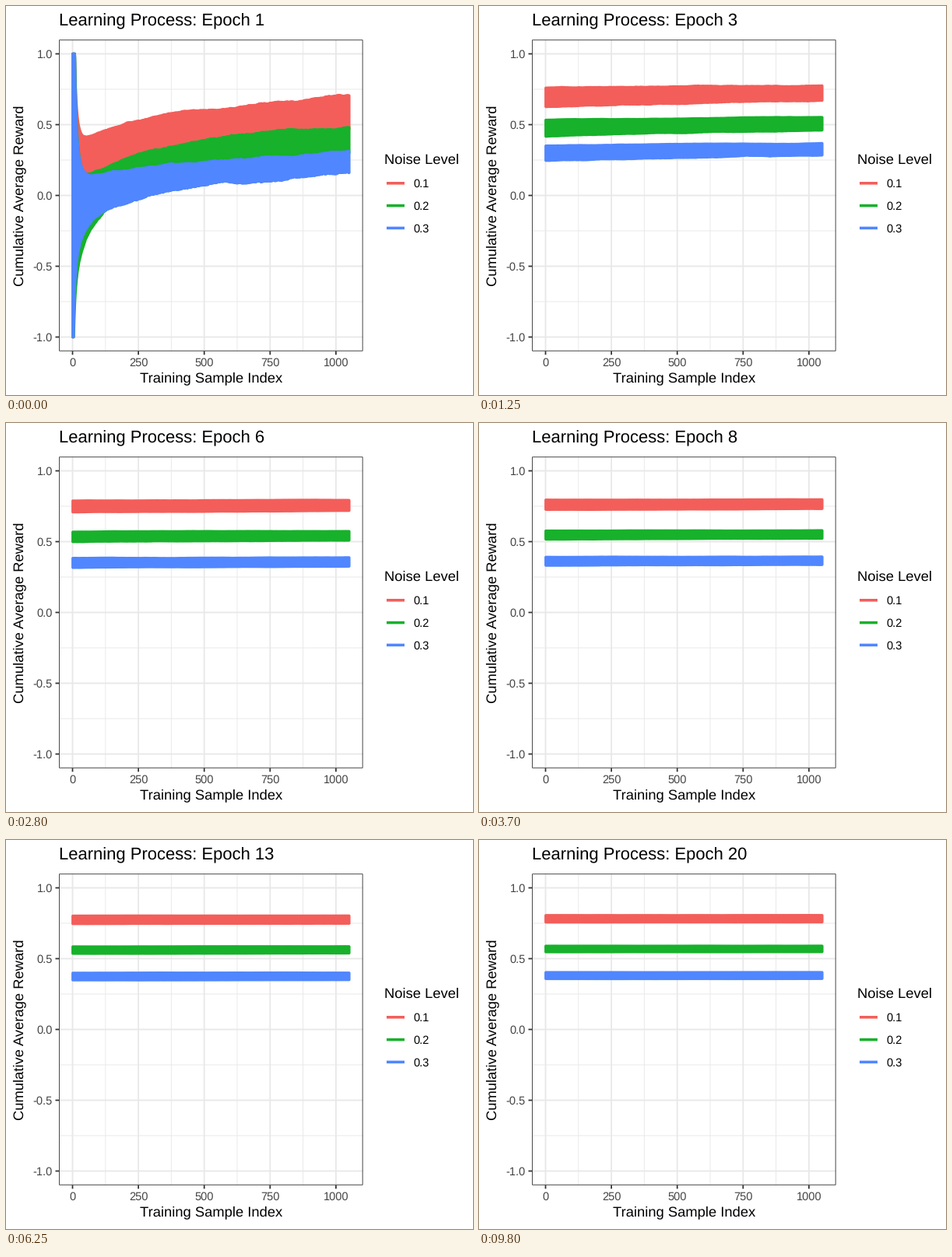
Recreate the animation shown at these times as a matplotlib script. Size 600 by 500 pixels, loop 10 s.

```python
import numpy as np
import matplotlib.pyplot as plt
from matplotlib.animation import FuncAnimation
from matplotlib.patches import Polygon, Rectangle

plt.rcParams.update({
    "font.family": "Liberation Sans",
    "text.hinting": "none",
    "path.snap": False,
})

W, H, DPI = 600, 500, 120
PT = 72 / DPI  # points per pixel
EPOCHS, SAMPLES = 20, 1050
LEFT, RIGHT, TOP, BOTTOM = 68.1, 458.6, 43.3, 443.7
GRID, DARK, LABEL = "#E8E8E8", "#333333", "#444444"
THICK = 3.56  # width of the data lines in pixels

# Name, colour, upper edge, lower edge of each band.
# Edge: long-run value, gap to it; first epoch: end value, log slope, spike.
LEVELS = [
    ("0.1", "#F35E5A", (0.812, 0.126, 0.705, 0.116, 8),
     (0.776, 0.355, 0.470, 0.160, -1)),
    ("0.2", "#17B12B", (0.597, 0.154, 0.480, 0.138, 12),
     (0.566, 0.354, 0.300, 0.200, -1)),
    ("0.3", "#5086FF", (0.410, 0.143, 0.310, 0.080, 10),
     (0.374, 0.302, 0.160, 0.125, -2)),
]

rng = np.random.default_rng(7)
index = np.arange(1, SAMPLES + 1)


def to_x(sample):
    return 85.5 + 0.3384 * np.asarray(sample)


def to_y(value):
    return 243.5 - 182 * np.asarray(value)


def bridge():
    """Random walk that starts and ends at zero, with unit deviation."""
    walk = np.cumsum(rng.normal(size=SAMPLES))
    walk -= np.linspace(walk[0], walk[-1], SAMPLES)
    return walk / walk.std()


def edge_states(limit, gap, end, slope, spike):
    """Edge of one band for every epoch, in pixels."""
    first = (end + slope * np.log(index / SAMPLES)
             + spike / index * np.exp(-index / 60) + 0.008 * bridge())
    states = [np.clip(first, -1, 1)]
    for done in range(1, EPOCHS):
        trend = limit - gap / (done + index / SAMPLES + 0.3)
        states.append(trend + 0.004 / done * bridge())
    return to_y(states)


def ease(p):
    return 4 * p ** 3 if p < 0.5 else 1 - 4 * (1 - p) ** 3


def locate(frame):
    """Epoch (from zero) and progress to the next one."""
    if frame < 99:
        epoch, step = divmod(frame, 11)
        return epoch, step / 10
    epoch, step = divmod(frame - 99, 10)
    return epoch + 9, step / 9


fig = plt.figure(figsize=(W / DPI, H / DPI), dpi=DPI, facecolor="white")
ax = fig.add_axes([0, 0, 1, 1])
ax.set_xlim(0, W)
ax.set_ylim(H, 0)
ax.axis("off")


def line(x0, y0, x1, y1, color, width, z):
    ax.plot([x0, x1], [y0, y1], color=color, lw=width * PT,
            solid_capstyle="butt", zorder=z)


def text(x, y, s, size, color="black", **kw):
    return ax.text(x, y, s, fontsize=size, color=color, zorder=6,
                   va="baseline", **kw)


# Grid, ticks and tick labels
for x in to_x(np.arange(125, 1000, 250)):
    line(x, TOP, x, BOTTOM, GRID, 0.89, 1)
for y in to_y(np.arange(-0.75, 1, 0.5)):
    line(LEFT, y, RIGHT, y, GRID, 0.89, 1)
for v in range(0, 1001, 250):
    x = to_x(v)
    line(x, TOP, x, BOTTOM, GRID, 1.78, 2)
    line(x, BOTTOM, x, BOTTOM + 4.6, DARK, 1.78, 5)
    text(x, 463, str(v), 8.8, LABEL, ha="center")
for v in np.linspace(-1, 1, 5):
    y = to_y(v)
    line(LEFT, y, RIGHT, y, GRID, 1.78, 2)
    line(LEFT - 4.6, y, LEFT, y, DARK, 1.78, 5)
    text(60, y + 5.2, f"{v:.1f}", 8.8, LABEL, ha="right")

ax.add_patch(Rectangle((LEFT + 0.45, TOP + 0.45), RIGHT - LEFT - 0.9,
                       BOTTOM - TOP - 0.9, fill=False, ec=DARK,
                       lw=0.89 * PT, zorder=5))

# Titles and legend
title = text(68, 25, "", 13.2)
text((LEFT + RIGHT) / 2, 483.5, "Training Sample Index", 11, ha="center")
text(22, 243.5, "Cumulative Average Reward", 11, rotation=90,
     rotation_mode="anchor", ha="center")
text(485.5, 203.3, "Noise Level", 11)

bands = []
for i, (name, color, upper, lower) in enumerate(LEVELS):
    y = 227.8 + 28.8 * i
    line(489, y, 512, y, color, THICK, 5)
    text(523.5, y + 5.3, name, 8.8)
    patch = Polygon([(0, 0), (1, 1)], closed=True, fc=color, ec=color,
                    lw=THICK * PT, joinstyle="round", zorder=3 + 0.1 * i)
    ax.add_patch(patch)
    bands.append((patch, edge_states(*upper), edge_states(*lower)))

px = to_x(index)
outline_x = np.concatenate([px, px[::-1]])


def draw(frame):
    epoch, p = locate(frame)
    following = min(epoch + 1, EPOCHS - 1)
    t = ease(p)
    for patch, upper, lower in bands:
        top = upper[epoch] + t * (upper[following] - upper[epoch])
        low = lower[epoch] + t * (lower[following] - lower[epoch])
        outline_y = np.concatenate([top, low[::-1]])
        patch.set_xy(np.column_stack([outline_x, outline_y]))
    shown = following if p >= 0.5 else epoch
    title.set_text(f"Learning Process: Epoch {shown + 1}")
    return [title] + [b[0] for b in bands]


anim = FuncAnimation(fig, draw, frames=200, interval=50, repeat=True,
                     repeat_delay=0, blit=False)
plt.show()
```
